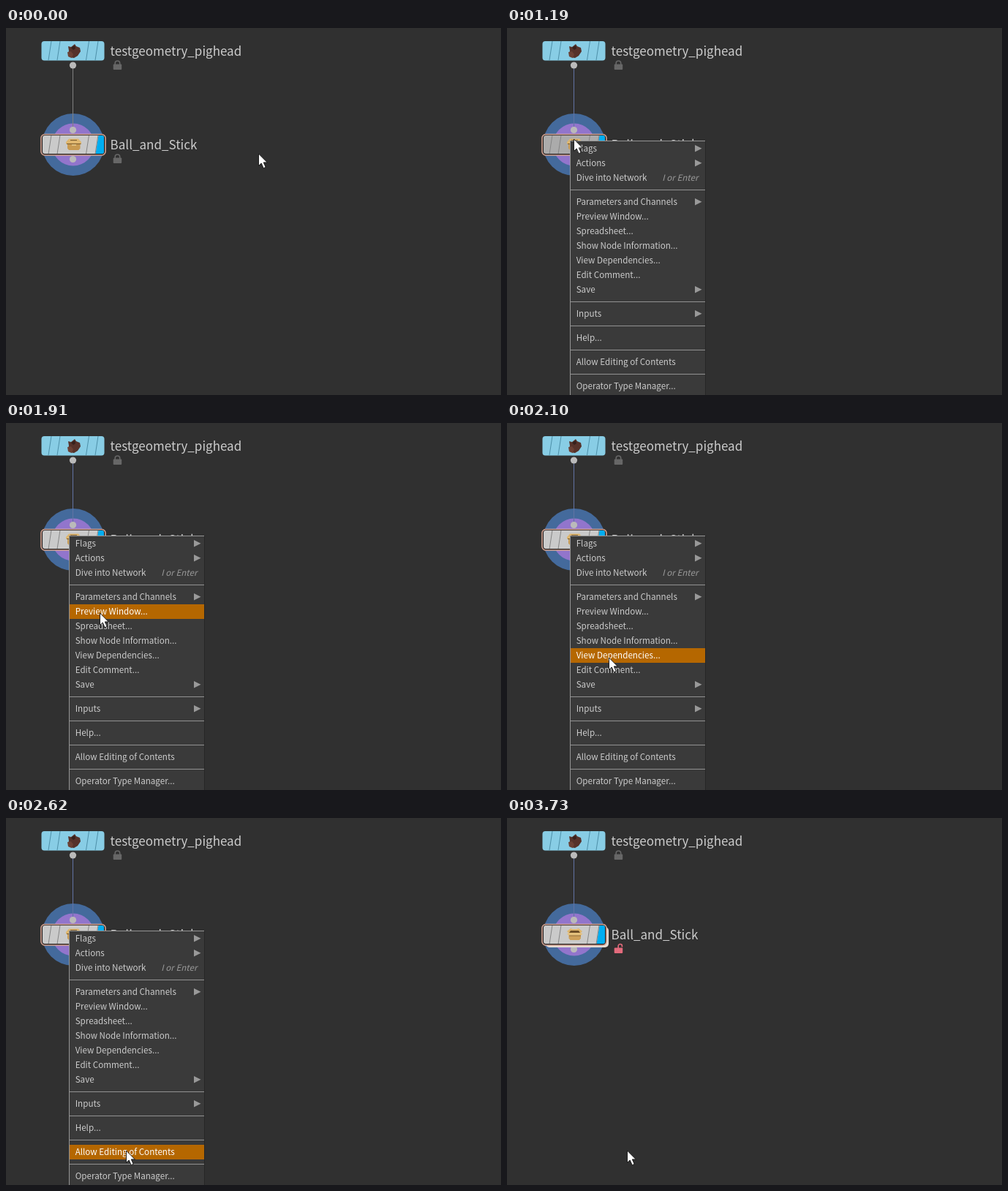
An HTML page for the animation above (5.02 s loop, 677 by 502 pixels).

```html
<!DOCTYPE html>
<html lang="en">
<head>
<meta charset="utf-8">
<title>Node menu</title>
<style>
  html, body { margin: 0; width: 100%; height: 100%; overflow: hidden; background: #303030; }
  svg { display: block; width: 100%; height: 100%; }
  text { font-family: "Noto Sans CJK JP", "Noto Sans CJK SC", "Noto Sans CJK", sans-serif; white-space: pre; }
  .title { font-size: 17px; fill: #ccc; }
  .row text { font-size: 11.64px; fill: #ccc; }
  .row .key { font-style: italic; fill: #999; text-anchor: end; }
  .row rect { fill: none; }
  .row path { fill: #999; }
  .row.on rect { fill: #b56700; }
  .row.on text { fill: #fff; }
</style>
</head>
<body>
<svg viewBox="0 0 677 502">
  <defs>
    <path id="stripes" fill="none" d="M62 0l-4 26M74 0l-4 26M113.500 0l-4 26M126 0l-4 26"/>
    <rect id="lock" y="5" width="11.500" height="7.500" rx="1"/>
    <clipPath id="body"><rect x="50" y="147" width="84" height="25" rx="3"/></clipPath>
  </defs>
  <rect width="677" height="502" fill="#303030"/>

  <!-- geometry node -->
  <rect x="48.500" y="18" width="86" height="26.500" rx="4" fill="#88cde5"/>
  <use href="#stripes" y="18" stroke="#4d8fa8"/>
  <g fill="#56322a">
    <path d="M85 25l4 1 5-4 2 3 5 2 1 5-4 6-5 3-6-1-2-4 1-5z"/>
    <path d="M84 33l5-1 3 4-2 5-5-2z" fill="#6b4034"/>
    <path d="M89 27l5-3 1 4-3 2z" fill="#35201c"/>
  </g>
  <text class="title" x="142.600" y="38">testgeometry_pighead</text>
  <g transform="translate(146.700 44.500)" fill="#676767" stroke="#676767">
    <use href="#lock" stroke="none"/>
    <path d="M2.500 6V3.500a3.250 3 0 0 1 6.500 0V6" fill="none" stroke-width="1.600"/>
  </g>

  <!-- asset node -->
  <circle cx="91.800" cy="159.500" r="42.500" fill="#446a9c"/>
  <circle cx="91.800" cy="159.500" r="29" fill="#9275cc"/>
  <path id="wire" d="M91.500 51V137"/>
  <g fill="#bababa">
    <circle cx="91.500" cy="51" r="4.600"/>
    <circle cx="91.500" cy="139.500" r="4.600"/>
    <circle cx="91.500" cy="179.500" r="4.600"/>
  </g>
  <rect id="stack" x="53" y="149" width="86" height="28" rx="5" fill="#e6ddd5"/>
  <rect x="48" y="145.500" width="88" height="28.500" rx="5" fill="#221d1c" stroke="#d3a393" stroke-width="1.600"/>
  <g clip-path="url(#body)">
    <rect id="face" x="50" y="147" width="84" height="25"/>
    <path id="flag" d="M113.500 147h12.500l-4 25h-12.500z" fill="#d8c5d6"/>
    <path d="M126.500 147H135v25h-12.500z" fill="#00adf0"/>
    <use href="#stripes" y="146.500" stroke="#858585"/>
  </g>
  <g id="closedBox">
    <path d="M82 156l4-4.500h13l4 4.500v2.500H82z" fill="#dfb76f"/>
    <path d="M84 158.500h17.500v6l-2 2.500h-13.500l-2-2.500z" fill="#c89a51"/>
    <path d="M88 153.500h9M83 158.500h19.500" stroke="#795a2c" fill="none"/>
    <path d="M90 160h6" stroke="#e9cc91" stroke-width="1.500"/>
  </g>
  <g id="openBox">
    <path d="M82 155l5-4 3 1h5l3-1 5 4-3 3H85z" fill="#dfb76f"/>
    <path d="M87 154h11l2 3H85z" fill="#6d4e27"/>
    <path d="M84.500 158h16.500v6.500l-2 2.500H86.500l-2-2.500z" fill="#cda05a"/>
    <path d="M82 158.500l3-1.500h15.500l3 1.500-3 2.500H85z" fill="#e5c17d"/>
    <path d="M85 161h16" stroke="#8f6b36"/>
  </g>
  <text class="title" x="142.600" y="166">Ball_and_Stick</text>
  <g id="assetLock" transform="translate(146.700 172.500)">
    <use href="#lock" stroke="none"/>
    <path id="shackle" fill="none" stroke-width="1.600"/>
  </g>

  <g id="menu">
    <rect x="86" y="154" width="185" height="350" fill="#3a3a3a"/>
    <path d="M86.500 504V154.500H271" fill="none" stroke="#959595"/>
    <path d="M271.500 154V504" stroke="#262626"/>
  </g>
  <path id="cursor" d="M.5 0V16.500L4.200 13L7.200 19.700L10.200 18.400L7.300 11.900H12.300Z" fill="#fff" stroke="#111" stroke-width=".9"/>
</svg>
<script>
const LOOP = 5020, HOVER = 570, MENU_OPEN = 1190, MENU_MOVE = 1510, MENU_CLOSE = 3610, UNLOCK = 3670;
const ROW_HEIGHT = 20, SEPARATOR_HEIGHT = 13;
const byId = id => document.getElementById(id);

// "-" is a separator, ">" marks a submenu, "|" precedes a shortcut
const entries = ["Flags>", "Actions>", "Dive into Network|I or Enter", "-",
  "Parameters and Channels>", "Preview Window...", "Spreadsheet...", "Show Node Information...",
  "View Dependencies...", "Edit Comment...", "Save>", "-", "Inputs>", "-", "Help...", "-",
  "Allow Editing of Contents", "-", "Operator Type Manager..."];

function add(parent, tag, attributes, text = "") {
  const node = document.createElementNS("http://www.w3.org/2000/svg", tag);
  for (const name in attributes) node.setAttribute(name, attributes[name]);
  node.textContent = text;
  return parent.appendChild(node);
}

function buildMenu() {
  const menu = byId("menu"), rows = [];
  let rowY = 155;
  for (const entry of entries) {
    if (entry === "-") {
      add(menu, "path", { d: `M87 ${rowY + 6.5}H271`, stroke: "#929292" });
      rowY += SEPARATOR_HEIGHT;
      continue;
    }
    const [label, key] = entry.split("|");
    const node = add(menu, "g", { class: "row" });
    add(node, "rect", { x: 87, y: rowY, width: 184, height: ROW_HEIGHT });
    add(node, "text", { x: 94.7, y: rowY + 14 }, label.replace(">", ""));
    if (key) add(node, "text", { x: 261.5, y: rowY + 14, class: "key" }, key);
    if (label.endsWith(">")) add(node, "path", { d: `M257 ${rowY + 5}l9.500 4.700l-9.500 4.700z` });
    rows.push({ node, y: rowY });
    rowY += ROW_HEIGHT;
  }
  return rows;
}
const rows = buildMenu();

// time, x, y, and whether the move towards this point is eased
const path = [
  [0, 345, 172], [585, 103, 153, true], [830, 90.5, 152, true], [1445, 90.5, 152],
  [1705, 117, 199.5], [2095, 139, 321], [2615, 164, 455]
];

// The pointer advances in discrete steps within each run.
function stepTime(t) {
  const start = [1510, 640, 50].find(s => t >= s);
  return start === undefined ? 0 : start + Math.floor((t - start + 5) / 65) * 65;
}

function pointerAt(t) {
  const next = path.findIndex(point => point[0] > t);
  if (next < 0) return path[path.length - 1].slice(1, 3);
  const a = path[next - 1], b = path[next];
  let u = (t - a[0]) / (b[0] - a[0]);
  if (b[3]) u = u * u * (3 - 2 * u);
  return [1, 2].map(i => a[i] + (b[i] - a[i]) * u);
}

const show = (id, visible) => byId(id).setAttribute("display", visible ? "inline" : "none");

function draw(t) {
  const [x, y] = pointerAt(stepTime(t));
  const menuVisible = t >= MENU_OPEN && t < MENU_CLOSE;
  const unlocked = t >= UNLOCK;
  const hovering = t < MENU_MOVE && x < 134;

  byId("cursor").setAttribute("transform", `translate(${Math.round(x)} ${Math.round(y)})`);
  show("menu", menuVisible);
  for (const row of rows) {
    row.node.classList.toggle("on", menuVisible && y >= row.y && y < row.y + ROW_HEIGHT);
  }

  byId("wire").setAttribute("stroke", t < HOVER ? "#808080" : "#6273a4");
  byId("face").setAttribute("fill", hovering && x < 111 ? "#ababab" : "#cacaca");
  show("flag", hovering && x >= 111 && x < 124);
  show("stack", unlocked);
  show("openBox", unlocked);
  show("closedBox", !unlocked);
  const lockColor = unlocked ? "#e36b7c" : "#676767";
  byId("assetLock").setAttribute("fill", lockColor);
  byId("assetLock").setAttribute("stroke", lockColor);
  byId("shackle").setAttribute("d", unlocked
    ? "M5.500 6V2.500a2.600 2.500 0 0 1 5.200 0V4"
    : "M2.500 6V3.500a3.250 3 0 0 1 6.500 0V6");
}

const begin = performance.now();
function frame() {
  draw((performance.now() - begin) % LOOP);
  requestAnimationFrame(frame);
}
frame();
</script>
</body>
</html>
```
